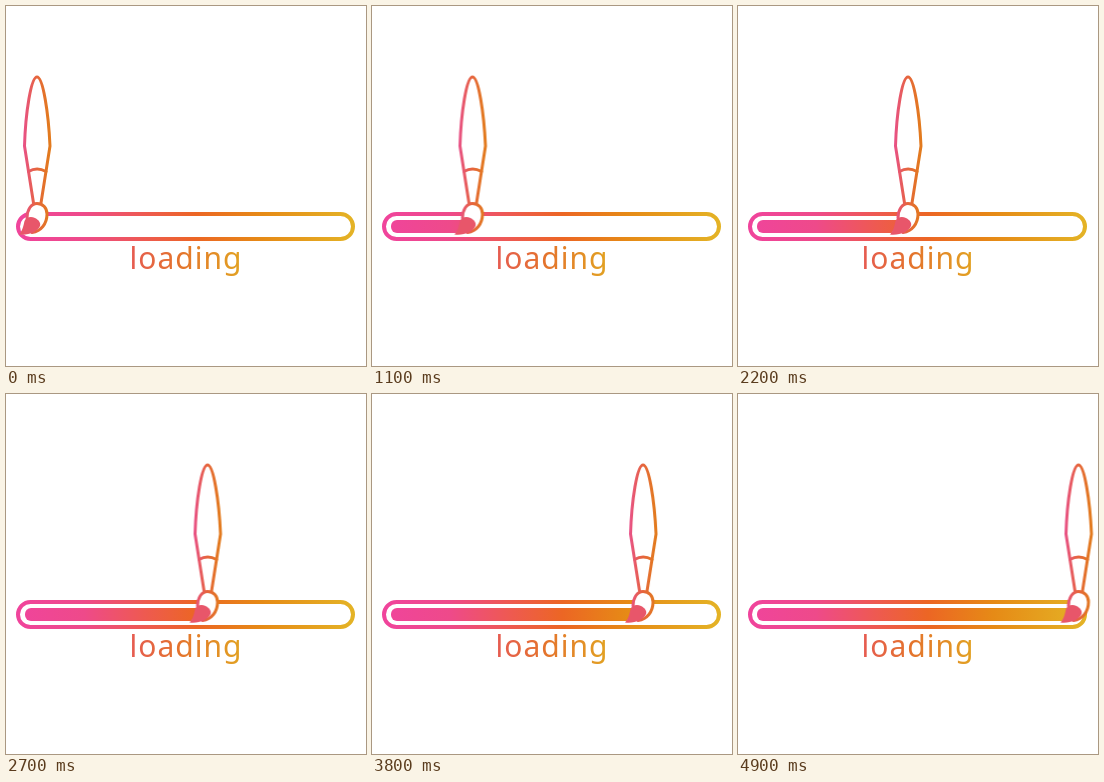
An HTML page for the animation above (5 s loop, 360 px wide and 360 px high).

```html
<!DOCTYPE html>
<html lang="en">
<head>
<meta charset="utf-8">
<title>Loading</title>
<style>
  html, body { margin: 0; width: 100%; height: 100%; overflow: hidden; background: #fff; }
  svg { display: block; width: 100vw; height: 100vh; }
  text { font: 30px "Noto Sans", "Open Sans", sans-serif; letter-spacing: 1px; }
  .fill { animation: fill 5s steps(50) infinite; }
  .brush { animation: slide 5s steps(50) infinite; }
  @keyframes fill { from { width: 7px; } to { width: 322.8px; } }
  @keyframes slide { from { transform: translateX(31px); } to { transform: translateX(346.8px); } }
</style>
</head>
<body>
<svg viewBox="0 0 360 360">
  <defs>
    <linearGradient id="bar" gradientUnits="userSpaceOnUse" x1="10" x2="350" y1="0" y2="0">
      <stop offset="0" stop-color="#f0449c"/>
      <stop offset=".2" stop-color="#ee4a8a"/>
      <stop offset=".38" stop-color="#ee5a50"/>
      <stop offset=".53" stop-color="#ec6624"/>
      <stop offset=".72" stop-color="#e68a16"/>
      <stop offset="1" stop-color="#e4b426"/>
    </linearGradient>
    <linearGradient id="ink" gradientUnits="userSpaceOnUse" x1="-14" x2="12" y1="0" y2="0">
      <stop offset="0" stop-color="#e8508a"/>
      <stop offset=".5" stop-color="#e6643f"/>
      <stop offset="1" stop-color="#e27a1e"/>
    </linearGradient>
    <linearGradient id="word" gradientUnits="userSpaceOnUse" x1="126" x2="233" y1="0" y2="0">
      <stop offset="0" stop-color="#e65c50"/>
      <stop offset=".45" stop-color="#e4742c"/>
      <stop offset="1" stop-color="#e2a022"/>
    </linearGradient>
  </defs>

  <rect x="12" y="208" width="335" height="25" rx="12.5" fill="none" stroke="url(#bar)" stroke-width="4"/>
  <rect class="fill" x="19" y="214" width="7" height="13" rx="6" fill="url(#bar)"/>
  <text x="123.5" y="262.5" fill="url(#word)">loading</text>

  <g class="brush" fill="none" stroke="url(#ink)" stroke-width="3" stroke-linejoin="round" stroke-linecap="round">
    <path d="M-3.5 197L-12.5 140C-11.5 107 -6 71 0 71C6 71 11.5 107 13 140L4 197"/>
    <path d="M-8.5 165.5Q0 160.500 9 165.500"/>
    <path fill="#fff" stroke="none" d="M0 197.500C-6 197.500 -10 204 -10 211C-11 218 -13 223 -17 228C-3 230 10 223 10 208C10 202 6 197.500 0 197.500Z"/>
    <path d="M-10 212C-10 204 -6 197.500 0 197.500C6 197.500 10 202 10 208C10 218 4 225 -5 226.500"/>
    <path fill="#e8566a" stroke="none" d="M-18 228.500C-14 224 -13.500 219 -12.500 215C-11 211 -6 210 -2 212C2 214 4 217 3 220C0 226 -8 229.500 -18 228.500Z"/>
  </g>
</svg>
</body>
</html>
```
